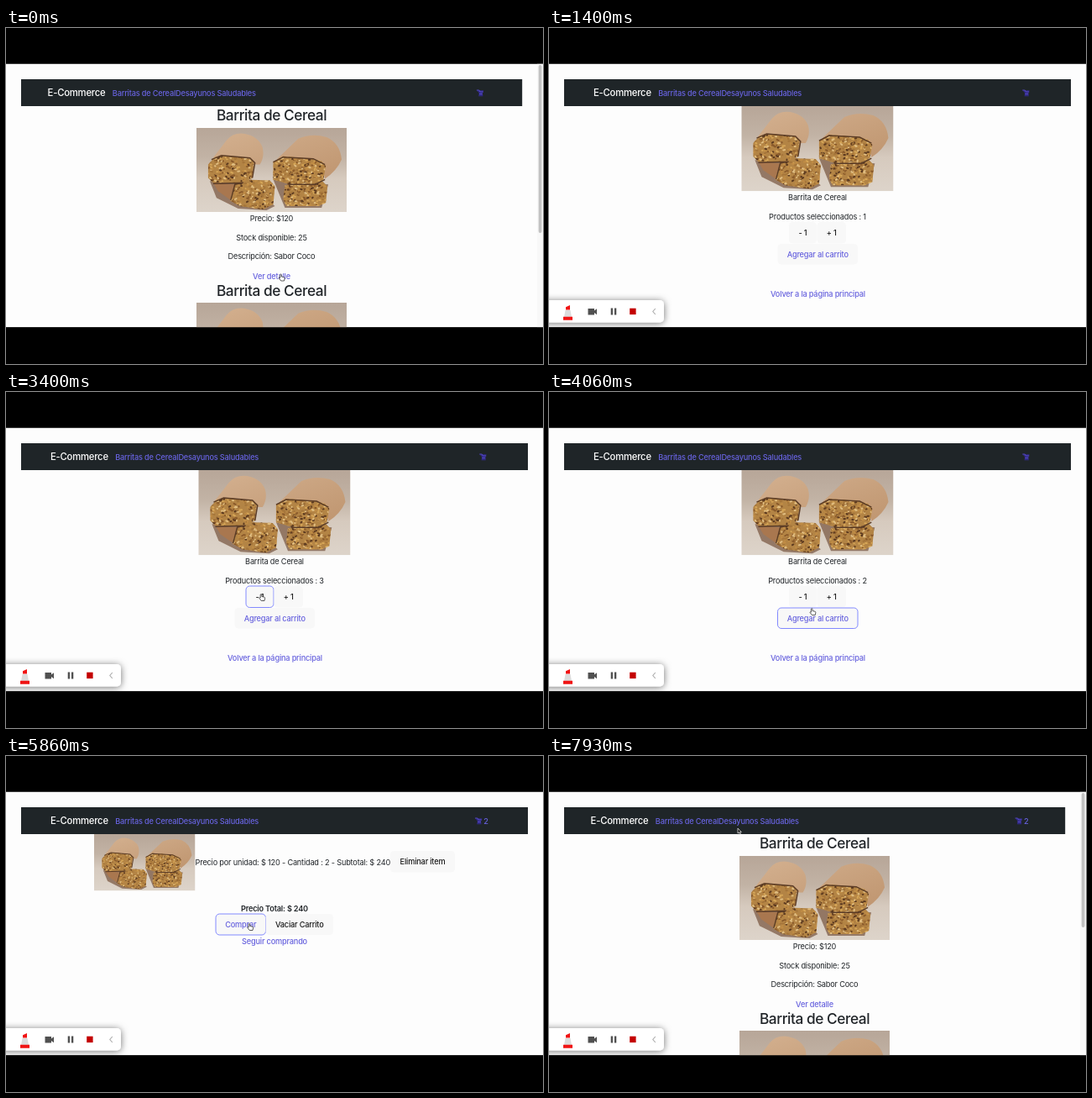
Animation, 640 px wide and 400 px high, one loop 8 s. Source, as an HTML page:

```html
<!DOCTYPE html>
<html lang="es">
<head>
<meta charset="utf-8">
<style>
  html, body { margin: 0; width: 100%; height: 100%; overflow: hidden; background: #000; }
  svg { display: block; width: 640px; height: 400px; }
  text { font: 9.2px Inter, "Liberation Sans", sans-serif; letter-spacing: -.021em; fill: #212529; }
  .mid { text-anchor: middle; }
  .title { font-size: 17.3px; font-weight: 500; letter-spacing: -.026em; }
  .brand { font-size: 11.3px; font-weight: 500; fill: #fff; }
  .link { font-weight: 500; fill: #6762de; }
  .button { font-weight: 500; fill: #1a1a1a; }
  .bold { font-weight: 600; }
</style>
</head>
<body>
<svg viewBox="0 0 640 400">
  <defs>
    <linearGradient id="cloth" x2="0" y2="1">
      <stop stop-color="#b7a698"/><stop offset=".35" stop-color="#c2b3a5"/><stop offset=".6" stop-color="#d6cabe"/><stop offset="1" stop-color="#ddd4ca"/>
    </linearGradient>
    <linearGradient id="paper" x2="1" y2="1">
      <stop stop-color="#d3b08f"/><stop offset="1" stop-color="#bf956f"/>
    </linearGradient>
    <path id="bars" d="M14 44L22 35L34 33L62 36L69 41L67 60L56 66L20 66L14 60Z M46 67L60 62L88 63L94 70L92 92L80 98L52 94L40 87Z
      M92 41L104 34L140 37L150 40L155 46L152 62L140 68L112 68L92 62Z M106 69L120 66L150 63L157 70L155 90L146 94L108 94L104 86Z"/>
    <clipPath id="barClip"><use href="#bars"/></clipPath>
    <filter id="shadow" x="-20%" y="-60%" width="140%" height="220%">
      <feDropShadow dx="0" dy="1" stdDeviation="4" flood-opacity=".55"/>
    </filter>
    <symbol id="photo" viewBox="0 0 180 101" preserveAspectRatio="none">
      <rect width="180" height="101" fill="url(#cloth)"/>
      <path d="M16 64L60 66L94 94L84 99L50 97L24 84Z M92 62L106 96L150 96L158 68Z" fill="#6f4b34" opacity=".65"/>
      <path d="M20 66L46 68L40 86L26 76Z" fill="#a9774f"/>
      <path d="M19 37L36 15Q44 5 58 7Q74 10 79 23Q82 34 76 44H66Z M96 38L122 13Q138 6 156 11Q172 18 174 38Q168 52 154 61L149 41Z" fill="url(#paper)"/>
      <use href="#bars" fill="#b38445"/>
      <g id="crumbs" clip-path="url(#barClip)" fill="none" stroke-width="2" stroke-linecap="round"/>
      <path d="M18 38L30 33L64 36L70 42L67 60M20 67L56 66L46 68L41 87M92 41L104 35L140 37L154 44M110 68L142 68L154 62" fill="none" stroke="#5b3c26" stroke-width="1.5"/>
    </symbol>
    <symbol id="trolley" overflow="visible">
      <path d="M0 1.2H8.3L7 5L7.6 8.2H2.2L3 5L1.8 3Z" fill="#302a84"/>
      <path d="M0 1H3L4 3H8M3 5.5H7" fill="none" stroke="#5a4ccb" stroke-width=".9"/>
    </symbol>
  </defs>
  <rect y="42.5" width="640" height="314" fill="#fdfdfd"/>
  <g id="page"></g>
  <g id="toolbar">
    <rect x="-10" y="324" width="147" height="26.5" rx="5" fill="#fff" filter="url(#shadow)"/>
    <path d="M19.5 336L18 344H27L25.5 336Z" fill="#dcdcdc"/>
    <path d="M20 332.3L25 330V335.5H20Z M17 343.8H28V347.8H17Z" fill="#f01414"/>
    <path d="M46.5 334H54V336.5L57 334.3V341.3L54 339V341.5H46.5Z M73.7 333.5H76V341.5H73.7Z M78 333.5H80.3V341.5H78Z" fill="#505050"/>
    <rect x="96.2" y="333.7" width="7.4" height="7.4" fill="#c40000"/>
    <path d="M126.8 334L123.8 337.5L126.8 341" fill="none" stroke="#aaa" stroke-width="1.1"/>
  </g>
  <g id="cursor" stroke-width=".8" stroke-linejoin="round">
    <path id="hand" d="M-.8 .6Q0 -.6 .8 .6V3L4 3.7Q4.8 4 4.6 5.2L4 8H.2L-2.2 4.8Q-2 3.7 -.8 4.6Z" fill="#fff" stroke="#333"/>
    <path id="arrow" d="M0 0V6L1.4 4.8L2.5 7.2L3.5 6.7L2.5 4.5H4.3Z" fill="#111" stroke="#ddd"/>
  </g>
  <path d="M0 0H640V42.5H0Z M0 356.3H640V400H0Z"/>
</svg>
<script>
const LOOP = 8000;
const $ = id => document.getElementById(id);

const text = (x, y, label, cls = 'mid') => `<text x="${x}" y="${y}" class="${cls}">${label}</text>`;
const photo = (x, y, w, h) => `<use href="#photo" x="${x}" y="${y}" width="${w}" height="${h}"/>`;

// Clickable areas per page: x, y, width, height, label, style, has a button box
const targets = {
  list: [[294, 289, 45, 12, 'Ver detalle', 'link']],
  detail: [
    [286, 231, 33, 25.5, '- 1', 'button', true],
    [319.5, 231, 34.5, 25.5, '+ 1', 'button', true],
    [272.5, 257, 95.5, 24.5, 'Agregar al carrito', 'link', true],
    [264, 310, 113, 12, 'Volver a la página principal', 'link']],
  cart: [
    [458, 113, 77, 25.5, 'Eliminar item', 'button', true],
    [250, 188, 59.5, 25, 'Comprar', 'link', true],
    [309.5, 188, 80.5, 25, 'Vaciar Carrito', 'button', true],
    [281, 214, 78, 12.5, 'Seguir comprando', 'link']],
  loading: []
};

const bodies = {
  list: (count, inCart) => text(316.5, 110, 'Barrita de Cereal', 'mid title') + photo(227, 119, 179, 100) +
    text(316.5, 229.7, 'Precio: $120') + text(316.5, 252.6, 'Stock disponible: 25') +
    text(316.5, 275.4, 'Descripción: Sabor Coco') +
    text(316.5, 318.5, 'Barrita de Cereal', 'mid title') + photo(227, 327, 179, 100) +
    '<rect x="633" y="42.5" width="7" height="314" fill="#f8f8f8"/>' +
    `<rect x="634.7" y="44" width="3.8" height="${inCart ? 160 : 200}" rx="1.9" fill="#c2c2c2"/>`,
  detail: count => photo(229.3, 93, 181.2, 101.2) + text(320, 205.1, 'Barrita de Cereal') +
    text(320, 227.7, 'Productos seleccionados : ' + count),
  cart: () => photo(105, 93, 120.5, 67.4) +
    text(225.6, 129.5, 'Precio por unidad: $ 120 - Cantidad : 2 - Subtotal: $ 240', '') +
    text(320, 184.7, 'Precio Total: $ 240', 'mid bold'),
  loading: () => text(320, 110, 'Cargando...', 'mid title')
};

function navbar(page, inCart) {
  const shift = page === 'list' ? -3.4 : 0;
  return `<rect x="18" y="61" width="${604 + shift * 2}" height="32" fill="#1f2528"/>` +
    text(53 + shift, 81.3, 'E-Commerce', 'brand') +
    text(130.2 + shift, 80.6, 'Barritas de CerealDesayunos Saludables', 'link') +
    `<use href="#trolley" x="${(inCart ? 559 : 564.3) + shift}" y="73"/>` +
    (inCart ? text(569.3 + shift, 80.6, '2', 'link') : '');
}

function target([x, y, w, h, label, style, boxed], hovered) {
  const box = boxed ? `<rect x="${x}" y="${y}" width="${w}" height="${h}" rx="4.5" fill="#f8f8f8"
    stroke="${hovered ? '#646cff' : 'none'}" stroke-width=".8"/>` : '';
  return box + text(x + w / 2, y + h / 2 + 3.5, label, 'mid ' + style);
}

const pageAt = t => t < 1000 ? 'list' : t < 1400 ? 'loading' : t < 4460 ? 'detail' :
  t < 6860 ? 'cart' : t < 7130 ? 'loading' : 'list';
const countAt = t => t < 2460 ? 1 : t < 2730 ? 2 : t < 3460 ? 3 : 2;

// Pointer moves: start, end, x, y
const moves = [
  [0, 0, 327.5, 293], [1600, 2400, 337, 241], [2930, 3350, 304, 240.5], [3730, 4260, 317.5, 265.5],
  [5060, 5800, 290, 199.5], [6330, 6790, 294.5, 219], [7460, 7930, 225, 86]
];

function pointerAt(t) {
  const i = moves.findLastIndex(m => m[0] <= t);
  const [start, end, x, y] = moves[i];
  const [, , fromX, fromY] = moves[Math.max(i - 1, 0)];
  const k = end > start ? Math.min((t - start) / (end - start), 1) : 1;
  const ease = k * k * (3 - 2 * k);
  return { x: fromX + (x - fromX) * ease, y: fromY + (y - fromY) * ease, movedAt: Math.min(t, end) };
}

const hitTest = (page, { x, y }) =>
  targets[page].findIndex(([l, top, w, h]) => x >= l && x <= l + w && y >= top && y <= top + h);

function scatterCrumbs() {
  let seed = 7;
  const random = () => (seed = seed * 16807 % 2147483647) / 2147483647;
  $('crumbs').innerHTML = ['#d6a657', '#8a5a2b', '#c08c45', '#5c3a20', '#e0bd80', '#a5753a'].map(color => {
    let d = '';
    for (let i = 0; i < 190; i++)
      d += `M${(12 + random() * 148).toFixed(1)} ${(32 + random() * 68).toFixed(1)}l${(random() * 4 - 2).toFixed(1)} ${(random() * 2 - 1).toFixed(1)}`;
    return `<path d="${d}" stroke="${color}"/>`;
  }).join('');
}

let shown = '';
function draw(t) {
  const page = pageAt(t), count = countAt(t), inCart = t >= 4460;
  const pointer = pointerAt(t);
  const hovered = hitTest(page, pointer);
  const state = [page, count, inCart, hovered].join();
  if (state !== shown) {
    shown = state;
    $('page').innerHTML = navbar(page, inCart) + bodies[page](count, inCart) +
      targets[page].map((item, i) => target(item, i === hovered)).join('');
  }
  // The pointer keeps its shape until it moves again
  const overTarget = hitTest(pageAt(pointer.movedAt), pointer) >= 0;
  const show = (id, visible) => $(id).setAttribute('display', visible ? 'inline' : 'none');
  show('hand', overTarget);
  show('arrow', !overTarget);
  show('cursor', t < 1400 || t >= 1600);
  show('toolbar', t >= 60);
  $('cursor').setAttribute('transform', `translate(${pointer.x} ${pointer.y})`);
}

scatterCrumbs();
const begin = performance.now();
function tick() {
  draw((performance.now() - begin) % LOOP);
  requestAnimationFrame(tick);
}
tick();
</script>
</body>
</html>
```
